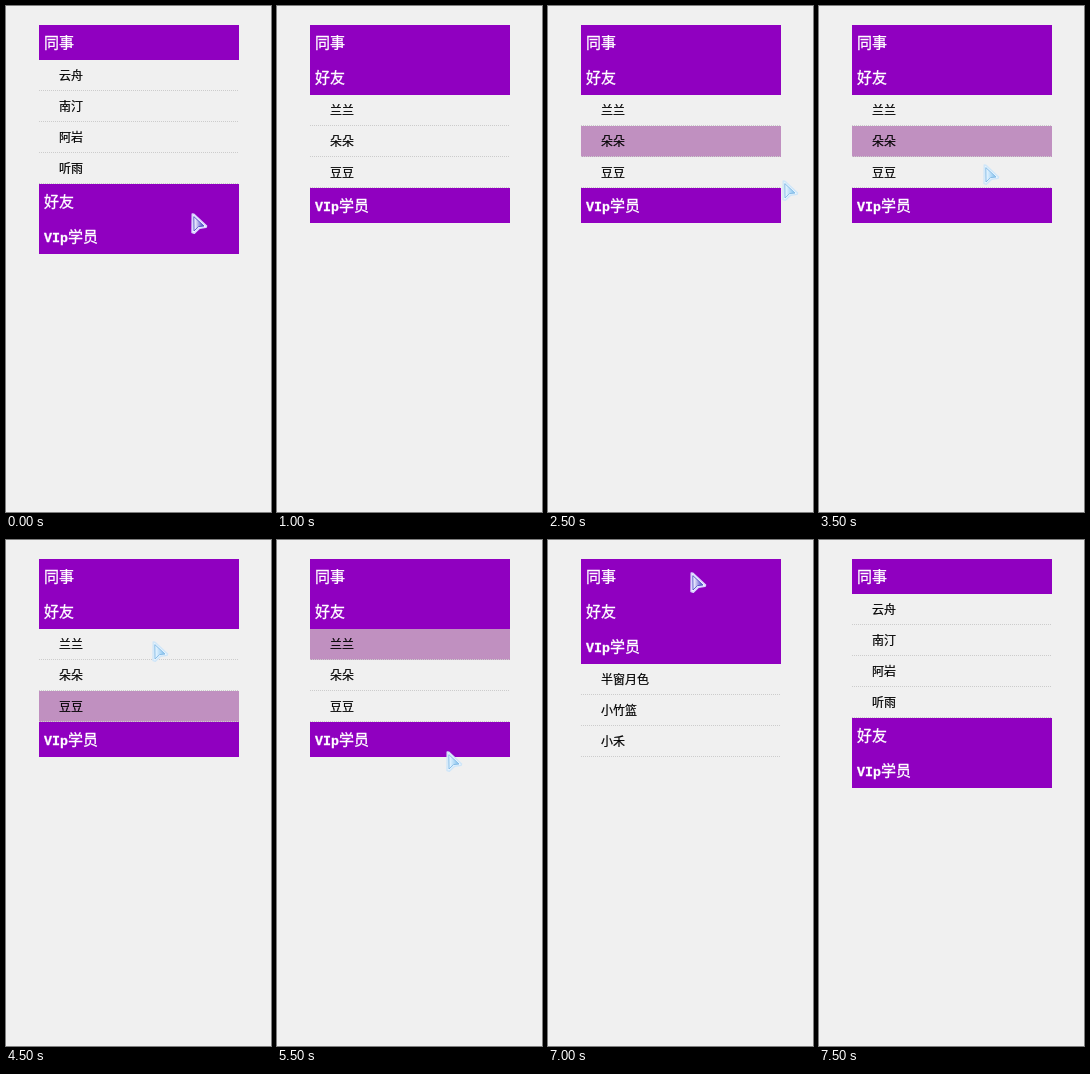
Animation of 265 by 506 pixels, one loop 8 s. Source, as an HTML page:

```html
<!DOCTYPE html>
<html lang="zh-CN">
<head>
<meta charset="utf-8">
<title>Accordion list</title>
<style>
  html, body { margin: 0; width: 100%; height: 100%; overflow: hidden; background: #f0f0f0; }
  body { position: relative; font-family: "Noto Sans CJK SC", "Noto Sans CJK", sans-serif; }
  #list { position: absolute; left: 33px; top: 19px; width: 200px; }
  .head {
    height: 35px; line-height: 33px; padding-left: 5px; overflow: hidden;
    background: #9000c0; color: #fff; font-size: 15px; white-space: nowrap;
    -webkit-text-stroke: 0.3px #fff;
  }
  .latin { font: 700 13.3px/1 "Liberation Mono", monospace; }
  .item {
    height: 31px; line-height: 30px; padding-left: 20px; overflow: hidden;
    background: repeating-linear-gradient(90deg, #ccc 0 1px, transparent 1px 2px) 0 100% / 100% 1px no-repeat;
    color: #000; font-size: 12px; white-space: nowrap;
    -webkit-text-stroke: 0.2px #000;
  }
  .group .item { display: none; }
  .group.open .item { display: block; }
  .item.on { background-color: #c090c0; }
  #cursor { position: absolute; left: 0; top: 0; width: 18px; height: 22px; overflow: visible; }
  #cursor path { stroke-linejoin: round; }
  .lilac .rim { fill: #f2f2ff; stroke: #d8d4ff; }
  .lilac .core { fill: url(#lilacFill); stroke: #5a58cc; }
  .blue .rim { fill: #e8f5ff; stroke: #cfe6f8; }
  .blue .core { fill: url(#blueFill); stroke: #86bce6; }
</style>
</head>
<body>
<div id="list"></div>
<svg id="cursor" viewBox="0 0 18 22">
  <defs>
    <linearGradient id="lilacFill">
      <stop offset="0.1" stop-color="#f0f0ff"/><stop offset="0.8" stop-color="#6a62d2"/>
    </linearGradient>
    <linearGradient id="blueFill">
      <stop offset="0.1" stop-color="#e4f4ff"/><stop offset="0.8" stop-color="#94caf2"/>
    </linearGradient>
  </defs>
  <path class="rim" stroke-width="1.4" d="M1.2 1 L3 1.2 L15.6 13 L15 14.4 L8.6 15.2 L3.4 20.2 L1 19.6 Z"/>
  <path class="core" stroke-width="1" d="M2.8 3.6 L13 13 L7.6 13.6 L3 18 Z"/>
</svg>
<script>
const STEP = 500;

const groups = [
  ["同事", "云舟", "南汀", "阿岩", "听雨"],
  ["好友", "兰兰", "朵朵", "豆豆"],
  ['<span class="latin">VIp</span>学员', "半窗月色", "小竹篮", "小禾"]
];

// open group, highlighted item (-1: none), cursor [x, y, tint]
const steps = [
  [0, -1, [185, 207, "lilac"]],
  [0, -1, [153, 197, "lilac"]],
  [1, -1],
  [1, -1, [129, 112, "blue"]],
  [1, -1, [135, 180, "blue"]],
  [1, 1, [234, 174, "blue"]],
  [1, 1, [173, 216, "blue"]],
  [1, 1, [164, 158, "blue"]],
  [1, 2],
  [1, 2, [146, 101, "blue"]],
  [1, 0],
  [1, 0, [169, 211, "blue"]],
  [2, -1],
  [2, -1, [196, 34, "lilac"]],
  [2, -1, [142, 32, "lilac"]],
  [0, -1]
];

const cursor = document.getElementById("cursor");
const list = document.getElementById("list");
list.innerHTML = groups.map(([title, ...items]) =>
  `<div class="group"><div class="head">${title}</div>` +
  items.map(name => `<div class="item">${name}</div>`).join("") + "</div>"
).join("");
const panels = [...list.children].map(el => ({ el, items: [...el.querySelectorAll(".item")] }));

function show([open, lit, pointer]) {
  panels.forEach(({ el, items }, g) => {
    el.classList.toggle("open", g === open);
    items.forEach((item, i) => item.classList.toggle("on", g === open && i === lit));
  });
  cursor.style.display = pointer ? "block" : "none";
  if (pointer) {
    const [x, y, tint] = pointer;
    cursor.style.transform = `translate(${x}px, ${y}px)`;
    cursor.setAttribute("class", tint);
  }
}

const start = performance.now();
let last = -1;

function tick() {
  const now = Math.floor((performance.now() - start) / STEP) % steps.length;
  if (now !== last) show(steps[last = now]);
  requestAnimationFrame(tick);
}
tick();
</script>
</body>
</html>
```
